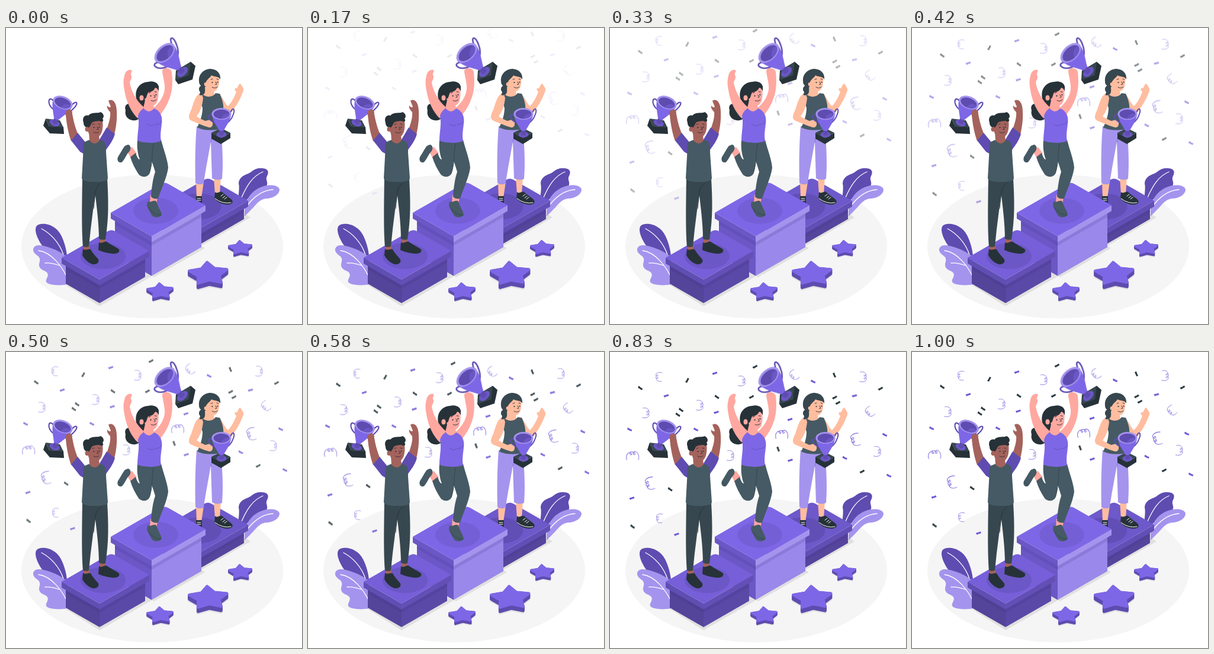
These frames come from a looping animation (500x500 px, 1.04 s). An HTML page:

```html
<!DOCTYPE html>
<html lang="en">
<head>
<meta charset="utf-8">
<title>Winners on a podium</title>
<style>
html, body { margin: 0; width: 100%; height: 100%; overflow: hidden; background: #fff; }
svg { display: block; width: 100vw; height: 100vh; }
.main { fill: #7e67e6; } .deep { fill: #5e4cb0; } .pale { fill: #a594ee; } .mid { fill: #6b57c5; }
.ink { fill: #263238; } .slate { fill: #37474f; } .grey { fill: #455a64; }
.brown { fill: #a4625c; } .pink { fill: #ffa8a0; } .peach { fill: #ffbd9f; }
.line { fill: none; stroke-linecap: round; stroke-linejoin: round; }
.vein { stroke: #fff; stroke-width: 1.3; }
.fine { stroke: #263238; stroke-width: .9; }
.handle { stroke: #5e4cb0; stroke-width: 2; }
.swirl { stroke: #8574e0; stroke-width: .8; }
#confetti { animation: drop 1040ms infinite; }
@keyframes drop {
  0% { opacity: 0; transform: translateY(-30px); animation-timing-function: cubic-bezier(.36, -.01, .5, 1.38); }
  96.154%, 100% { opacity: 1; transform: none; }
}
</style>
</head>
<body>
<svg viewBox="0 0 500 500" xmlns="http://www.w3.org/2000/svg">
<defs>
  <path id="chip" d="M-4.2-1.8C-2-2.4 0-.6 3.8-1.6L4.4 1.4C1 2.4-1 .8-3.6 1.6Z"/>
  <path id="curl" class="line swirl" d="M5-7C-1-9-6-6-5.5-3C-5 0-1-1-2-3C-3-5-6-1-5.5 2C-5 4-1 3-2 1C-3 0-6 3-4 5.5C-2 8 2 8 4 7.5"/>
  <g id="look">
    <path class="line fine" d="M-7-5L-4-6M3-6L6-5M-5 8Q0 11 4 7.5M1-1L3 3L.5 3.5"/>
    <circle class="ink" cx="-4.5" r="1.1"/><circle class="ink" cx="4.5" cy="-.5" r="1.1"/>
  </g>
  <g id="cup">
    <path class="line handle" d="M-14 4C-25-4-25 12-9 16M14 1C18-14 25-9 19 3C17 9 13 13 9 16"/>
    <ellipse class="mid" cy="35" rx="8.5" ry="5"/>
    <path class="deep" d="M-3 22L-4 35Q0 38 4 35L3 22Z"/>
    <path class="main" d="M-16.5 0C-15 12-8 20-4 28Q0 30 4 28C8 20 15 12 16.5 0Z"/>
    <ellipse class="pale" rx="16.5" ry="10"/>
    <ellipse class="deep" cy=".6" rx="13.5" ry="7.8"/>
    <path class="mid" d="M-1 8.3C7 8 13 5 13.4 1C9-3 2 1-1 8.3Z"/>
  </g>
</defs>

<ellipse cx="247" cy="369" rx="221" ry="121.5" fill="#f5f5f5"/>
<path fill="#e0e0e0" d="M96 431L158 470L247 419L250 421L336 372L330 368L413 320L404 314L158 456Z"/>
<g id="confetti"></g>

<!-- leaves -->
<path class="deep" d="M103 385C91 382 69 381 60 366C52 354 47 340 52 334C61 327 83 331 93 350C99 362 102 374 103 385Z"/>
<path class="line vein" d="M60 339C75 347 90 362 97 383"/>
<path class="pale" d="M46 373C49 364 62 367 74 371C86 375 100 382 103 390V433C90 436 70 434 68 429C66 424 73 420 70 414C67 409 58 410 56 402C55 396 60 392 55 386C50 382 45 379 46 373Z"/>
<path class="line vein" d="M55 376C78 379 95 405 101 417M66 397C75 396 84 399 90 401"/>
<path class="deep" d="M393 292C392 282 395 270 393 263C393 254 400 249 409 246C417 242 421 235 434 237C442 238 445 242 441 250C437 256 445 262 439 268C432 274 422 272 418 280C412 285 407 290 403 293Z"/>
<path class="line vein" d="M398 286C406 268 416 250 434 243"/>
<path class="pale" d="M403 312C403 294 411 277 430 269C444 263 461 265 462 273C462 281 451 288 440 288C428 289 424 297 416 305C412 309 408 313 403 318Z"/>
<path class="line vein" d="M405 303C418 285 432 274 451 273"/>

<g id="third"></g>

<!-- woman on the right -->
<g>
  <path class="peach" d="M321 260H334L330 287H322ZM351 252H363L361 281H353Z"/>
  <path class="ink" d="M321 284H331V298L321 293ZM353 277C357 281 361 275 365 277C370 282 379 287 382 291C385 297 378 299 370 298C362 297 356 292 352 288Z"/>
  <path class="line" stroke="#fff" d="M363 284L367 281M366 287L370 284M369 289L373 286M353 288Q366 298 380 295M323 288H329M323 291H329"/>
  <path class="pale" d="M322 166C320 190 319 225 320 262C325 265 331 265 334 262C337 240 342 215 346 192L348 254C354 257 360 257 365 255C367 230 366 205 363 168Z"/>
  <path class="line" stroke="#8673d8" d="M346 193C347 187 349 183 352 180"/>
  <path class="peach" d="M361 111C368 122 372 130 375 132C381 126 386 116 389 108C385 104 386 100 390 102C392 99 393 94 396 94C398 98 402 101 401 106C398 114 394 124 386 135C382 143 378 146 374 143C368 140 364 134 361 126Z"/>
  <path class="peach" d="M337 96L351 103L352 114L345 121L333 113Z"/>
  <path class="grey" d="M332 112C339 118 350 117 354 110L361 111C366 122 368 130 367 140L369 168C355 174 335 174 323 168C328 158 332 146 332 135C329 128 329 118 332 112Z"/>
  <path class="peach" d="M330 110C320 112 318 124 313 138C308 148 307 154 314 157C324 161 333 165 340 167C346 170 350 166 349 160C348 154 342 155 337 157C330 154 324 151 322 149C328 142 332 130 333 118Z"/>
  <path class="slate" d="M330 97C325 100 325 105 328 108C327 112 327 114 325 112C328 115 335 114 336 108C337 104 335 101 337 98Z"/>
  <path class="peach" d="M338 88C335 102 342 108 350 107C358 106 361 98 360 82L348 77Z"/>
  <path class="slate" d="M326 90C325 76 336 69 346 69C357 70 363 77 362 87C359 81 353 83 347 80C344 85 340 86 338 91L337 99C330 100 326 96 326 90Z"/>
  <circle class="peach" cx="338" cy="95" r="3.3"/>
  <use href="#look" x="353" y="92"/>
  <path class="slate" d="M347 177L363 169L379 177L363 186Z"/>
  <path class="ink" d="M347 177L363 186V196L347 187ZM363 186L379 177V186L363 196Z"/>
  <use href="#cup" transform="translate(364 145)"/>
</g>

<g id="first"></g>
<g id="second"></g>

<!-- woman in the centre -->
<g>
  <path class="pink" d="M203 206L213 201L221 212L211 220ZM244 282H257L254 297H243Z"/>
  <path class="grey" d="M206 197C211 198 212 204 208 209C203 213 201 223 195 227C190 228 187 224 189 218C193 212 198 202 201 199ZM239 293C244 296 250 289 254 293C257 303 262 309 263 315C261 320 253 321 248 318C243 312 240 304 238 300Z"/>
  <path class="grey" d="M223 189C235 195 250 195 262 189C266 205 273 222 274 236C272 252 263 270 257 288Q250 290 245 285C246 270 248 255 252 243C248 228 242 215 236 200Z"/>
  <path class="grey" d="M222 190L249 194C247 212 246 236 243 245C238 254 228 252 224 247C218 238 213 228 210 218L219 211C221 217 223 222 226 222C222 212 221 200 222 190Z"/>
  <path class="line" stroke="#37474f" d="M249 196C246 210 248 228 243 242M190 220Q196 224 196 226M240 303Q250 317 262 316"/>
  <path class="ink" d="M220 119C217 103 226 92 240 91C250 88 260 94 258 103L240 122C235 136 230 142 227 146C230 152 222 157 214 156C205 155 200 147 202 139C199 130 206 126 211 129C216 129 219 126 220 119Z"/>
  <path class="pink" d="M200 81C201 73 208 69 212 71C214 74 210 76 211 79C214 84 210 88 209 92C211 105 219 122 233 134L223 153C212 143 203 125 200 105C198 95 198 88 200 81Z"/>
  <path class="pink" d="M264 72C266 66 278 67 280 74C282 92 281 108 275 122C271 133 265 140 260 148L248 136C259 127 266 117 268 104C269 94 265 84 264 72Z"/>
  <path class="main" d="M223 148C226 139 233 134 238 134C246 136 250 134 256 139C264 146 264 155 263 162C262 172 260 180 262 191C252 195 232 195 222 190C222 175 226 163 223 148Z"/>
  <path class="line" stroke="#6652bc" d="M239 162Q244 167 250 164M252 163Q259 164 262 158"/>
  <path class="pink" d="M235 122L249 128L250 136Q241 146 232 135Z"/>
  <path class="pink" d="M235 110C232 123 237 131 246 132C255 130 259 122 257 102L249 99Z"/>
  <path class="ink" d="M232 119C229 104 236 93 248 92C254 91 259 96 258 107C256 102 254 101 252 101C249 107 244 108 240 109C238 112 238 116 236 119Z"/>
  <ellipse class="pink" cx="229" cy="118" rx="3.5" ry="4.5"/>
  <use href="#look" transform="translate(249 114) rotate(-8)"/>
  <path class="ink" d="M287 72L312 57L320 64L315 87L291 95L286 88Z"/>
  <path class="slate" d="M288 71L312 58L309 80L287 88Z"/>
  <use href="#cup" transform="translate(268 42) rotate(-43) scale(1.26)"/>
  <path class="pink" d="M264 73C266 66 274 68 276 70C280 72 278 78 274 80L265 79Z"/>
</g>

<!-- man on the left -->
<g>
  <path class="brown" d="M130 366H141L142 378H131ZM157 354H168L167 366H158Z"/>
  <path class="ink" d="M130 373C134 377 140 372 143 374C146 380 153 387 156 391C158 397 152 400 146 399C138 396 133 391 129 384ZM157 362C162 365 166 360 170 361C177 366 186 370 191 374C193 380 186 382 178 381C170 380 162 378 156 375Z"/>
  <path class="slate" d="M129 254L154 260L148 300L143 340L140 369Q135 371 130 369C128 345 128 310 129 254Z"/>
  <path class="slate" d="M149 257L171 254C173 290 174 320 168 357Q162 359 157 356C157 330 153 300 150 275Z"/>
  <path class="line fine" d="M160 262Q153 266 151 277L148 305"/>
  <path class="brown" d="M101 146C99 137 108 135 111 141C113 148 114 162 122 180L110 191C106 180 102 162 101 146Z"/>
  <path class="brown" d="M173 123C178 119 184 123 186 132C188 142 188 160 183 180L170 171C174 160 177 150 176 142C172 138 170 134 171 131C173 134 176 135 177 133Z"/>
  <path class="deep" d="M121 177L135 194L132 213L125 209L110 190ZM170 168L184 179C181 190 174 199 168 207L157 190Z"/>
  <path class="grey" d="M131 200C128 192 140 189 146 188L157 189C168 190 170 196 169 210L172 254Q171 260 150 260Q130 260 128 254Z"/>
  <path class="brown" d="M140 176L157 181L158 190Q150 200 141 190Z"/>
  <path class="brown" d="M138 160C136 178 142 185 152 185C161 184 165 172 163 155L145 154Z"/>
  <path class="ink" d="M131 160C128 152 133 146 139 148C145 141 155 145 160 142C166 145 166 151 163 153C166 157 163 160 158 157C152 157 147 158 145 160C143 163 142 167 139 169C134 168 131 165 131 160Z"/>
  <ellipse class="brown" cx="137" cy="171" rx="3.5" ry="4"/>
  <use href="#look" x="153" y="168"/>
  <path class="ink" d="M67 153L73 166L97 167L98 179L74 178L63 165Z"/>
  <path class="slate" d="M67 153L91 156L97 168L73 166Z"/>
  <use href="#cup" transform="translate(96 126) rotate(22) scale(1.06)"/>
  <path class="brown" d="M100 145C100 137 110 135 112 142L110 148L102 150Z"/>
</g>

<g id="stars"></g>
</svg>
<script>
const SLOPE = .575;

function add(parent, tag, attrs) {
  const el = document.createElementNS("http://www.w3.org/2000/svg", tag);
  for (const key in attrs) el.setAttribute(key, attrs[key]);
  document.getElementById(parent).append(el);
}

function shape(parent, points, fill, stroke = 0) {
  add(parent, "polygon", { points: points.join(" "), fill, stroke: fill, "stroke-width": stroke, "stroke-linejoin": "round" });
}

// Isometric box with an overhanging lid; (x, y) is the left corner of the lid.
function podium(id, x, y, wide, deep, tall, tone) {
  const inset = 7, lid = 10, strip = 6;
  const left = [x, y];
  const front = [x + wide, y + wide * SLOPE];
  const right = [front[0] + deep, front[1] - deep * SLOPE];
  const back = [x + deep, y - deep * SLOPE];
  const shift = ([px, py], dx, dy) => [px + dx, py + dy];
  const wall = (a, b, from, to, fill) =>
    shape(id, [shift(a, 0, from), shift(b, 0, from), shift(b, 0, to), shift(a, 0, to)], fill);
  const foot = shift(front, 0, -inset * SLOPE);
  const sides = [[shift(left, inset, 0), foot, tone.left], [foot, shift(right, -inset, 0), tone.right]];
  for (const [a, b, fill] of sides) {
    wall(a, b, lid, tall, fill);
    wall(a, b, lid, lid + 4 + strip, "#37287826");
  }
  wall(left, front, 0, lid, tone.lidLeft);
  wall(front, right, 0, lid, tone.lidRight);
  const near = (dx, dy) => shift(back, dx, dy * SLOPE);
  add(id, "path", { fill: tone.top, d: `M${left}L${near(-6, 6)}Q${back} ${near(6, 6)}L${right}L${front}Z` });
  add(id, "ellipse", { cx: x + (wide + deep) / 2 - 4, cy: y + (wide - deep) * SLOPE / 2 + 3, rx: 38, ry: 22, fill: tone.spot });
}

podium("third", 250, 305, 68, 91, 31, {
  top: "#6d59ca", spot: "#624fb6", left: "#54439a", right: "#56459d", lidLeft: "#5e4cb0", lidRight: "#624fb6"
});
podium("first", 177, 312, 69, 91, 71, {
  top: "#7e67e6", spot: "#755fd6", left: "#6b57c5", right: "#9a88ea", lidLeft: "#6b57c5", lidRight: "#a594ee"
});
podium("second", 94, 388, 64, 84, 44, {
  top: "#765fd8", spot: "#6b57c5", left: "#54449a", right: "#5a49a6", lidLeft: "#604fb3", lidRight: "#6350b6"
});

// Thick five-pointed star lying on the floor.
function star(x, y, size) {
  const layer = (drop, fill) => {
    const points = Array.from({ length: 10 }, (_, i) => {
      const angle = (i * 36 - 94) * Math.PI / 180;
      const r = size * (i % 2 ? .56 : 1);
      return [x + r * Math.cos(angle), y + drop * size + r * SLOPE * Math.sin(angle)];
    });
    shape("stars", points, fill, size * .14);
  };
  layer(.29, "#e0e0e0");
  for (let drop = .22; drop > 0; drop -= .03) layer(drop, "#5e4cb0");
  layer(0, "#7e67e6");
}
star(342, 415, 33.5);
star(260.5, 444, 22.3);
star(396, 371, 20);

// Each group shares a tilt; spots are where the pieces come to rest.
function scatter(id, fill, tilt, size, spots) {
  spots.forEach(([x, y]) => add("confetti", "use", {
    href: "#" + id, ...(fill && { fill }),
    transform: `translate(${x} ${y}) rotate(${tilt}) scale(${size})`
  }));
}
const dark = "#2c3a41", purple = "#6f58d8";
scatter("curl", "", 0, 1, [[83, 40], [84, 279]]);
scatter("curl", "", -15, 1.35, [[68, 220], [415, 146]]);
scatter("curl", "", -40, 1.1, [[439, 99], [311, 37]]);
scatter("curl", "", 85, 1.35, [[38, 174], [290, 138]]);
scatter("curl", "", 180, 1.1, [[222, 47], [427, 40], [451, 166], [203, 173], [151, 88], [60, 101]]);
scatter("chip", dark, 30, 1, [[51, 59], [120, 96], [114.5, 104], [180.5, 74], [101.5, 230], [38, 293]]);
scatter("chip", dark, -33, 1, [[245, 23], [239, 74], [379.5, 75], [385, 84], [457, 60], [426, 200]]);
scatter("chip", dark, 62, 1, [[379, 37], [284, 162]]);
scatter("chip", dark, -65, 1, [[130.5, 46]]);
scatter("chip", purple, 23, 1, [[33, 129], [145, 129], [343, 48], [396.5, 177], [464, 138], [471, 207]]);
scatter("chip", purple, -23, 1, [[177, 34], [95, 72], [179.5, 100], [37, 245], [112.5, 306], [304, 112], [304.5, 181], [413, 72]]);
</script>
</body>
</html>
```
